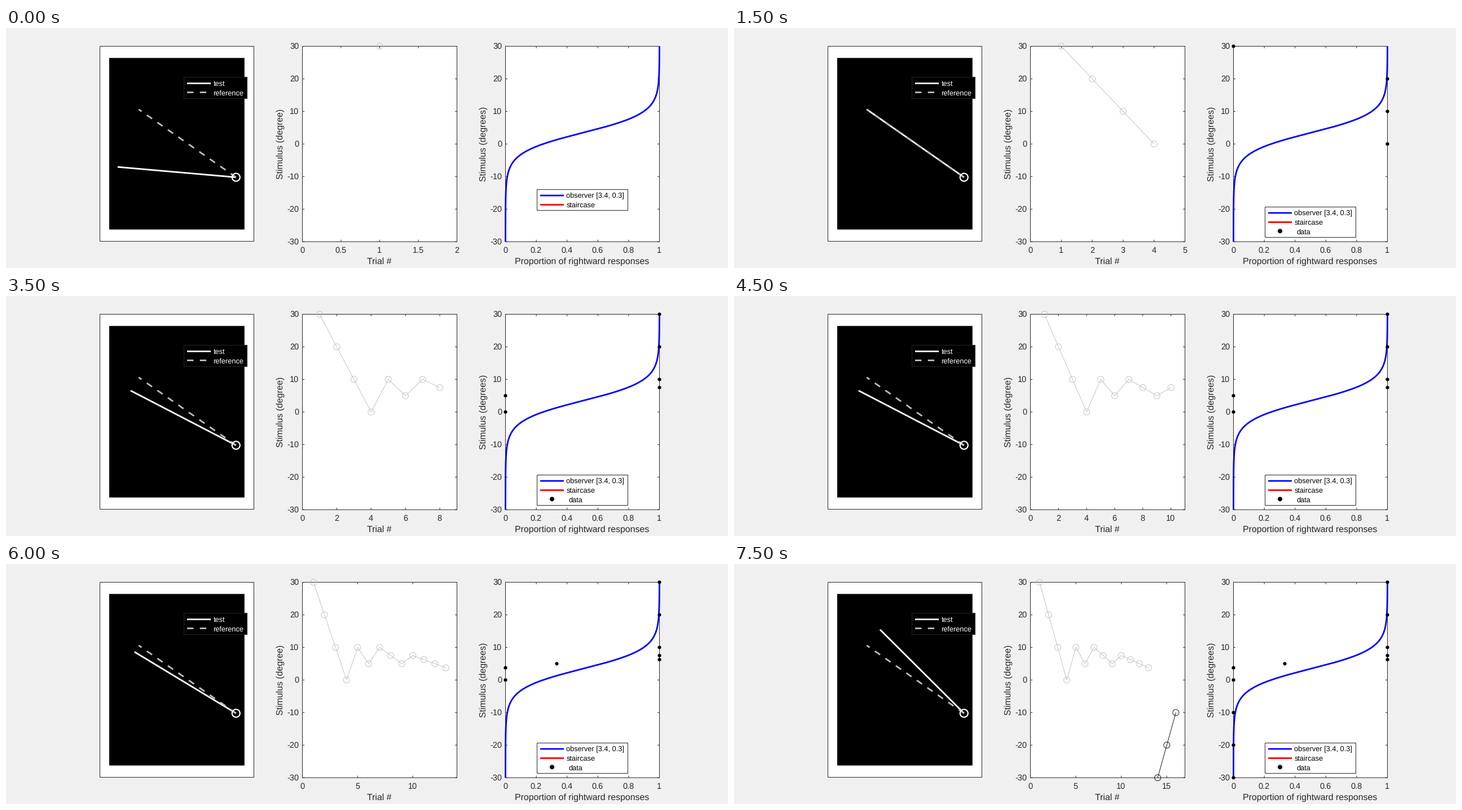
Recreate the animation shown at these times as a matplotlib script. Size 1280 px wide and 427 px high, loop 8 s.

```python
import matplotlib.pyplot as plt
import numpy as np
from matplotlib.animation import FuncAnimation
from matplotlib.patches import Circle, Rectangle

W, H, DPI = 1280, 427, 72  # at 72 dpi one point is one pixel
INK = "#262626"
TICK, LABEL, LEGEND = 14.5, 15.9, 12.8
TOP, BOTTOM = 32.5, 380.2
TRIAL_X = (525.5, 799.5)
PROP_X = (885.5, 1158.5)
PIVOT, ARM, REF_ANGLE = (407.8, 265.6), 210.7, 35
THRESHOLD, SLOPE = 3.42, 0.33

STIMULI = [30, 20, 10, 0, 10, 5, 10, 7.5, 5, 7.5, 6.25, 5, 3.75, -30, -20, -10]
RESPONSES = [1, 1, 1, 0, 1, 0, 1, 1, 0, 1, 1, 1, 0, 0, 0, 0]
FIRST_RUN = 13

plt.rcParams.update({"font.family": "Liberation Sans", "path.snap": False,
                     "text.hinting": "no_hinting"})
fig = plt.figure(figsize=(W / DPI, H / DPI), dpi=DPI, facecolor="#f0f0f0")
ax = fig.add_axes([0, 0, 1, 1])
ax.set_xlim(0, W)
ax.set_ylim(H, 0)
ax.axis("off")


def line(xs, ys, color=INK, lw=1.0, z=2, **kw):
    return ax.plot(xs, ys, color=color, lw=lw, zorder=z,
                   solid_capstyle="butt", dash_capstyle="butt", **kw)[0]


def box(x0, y0, x1, y1, face="white", edge=INK, z=1):
    return ax.add_patch(Rectangle((x0, y0), x1 - x0, y1 - y0, facecolor=face,
                                  edgecolor=edge, lw=1, zorder=z, snap=False))


def circle(x, y, r, face="none", edge="none", lw=0.0, z=4):
    return ax.add_patch(Circle((x, y), r, facecolor=face, edgecolor=edge,
                               lw=lw, zorder=z))


def text(x, y, s, size, color=INK, ha="center", **kw):
    return ax.text(x, y, s, size=size, color=color, ha=ha, va="baseline",
                   zorder=6, **kw)


def stim_y(stimulus):
    return TOP + (30 - np.asarray(stimulus)) * (BOTTOM - TOP) / 60


def scale(value, span, limit=1):
    return span[0] + np.asarray(value) * (span[1] - span[0]) / limit


def x_ticks(span, limit, step):
    artists = []
    for value in np.arange(0, limit + 1e-9, step):
        x = scale(value, span, limit)
        artists += [line([x, x], [BOTTOM, BOTTOM - 3.5]),
                    line([x, x], [TOP, TOP + 3.5]),
                    text(x - 0.3, 400.3, f"{value:g}", TICK)]
    return artists


def panel(span, xlabel, ylabel):
    left, right = span
    box(left, TOP, right, BOTTOM)
    for value in range(-30, 31, 10):
        y = stim_y(value)
        line([left, left + 3.5], [y, y])
        line([right, right - 3.5], [y, y])
        text(left - 6.2, y + 4.8, str(value), TICK, ha="right")
    text(sum(span) / 2 - 0.6, 420, xlabel, LABEL)
    text(left - 34.6, stim_y(0), ylabel, LABEL, rotation=90, rotation_mode="anchor")


def arm_tip(angle):
    a = np.radians(angle)
    return PIVOT[0] - ARM * np.cos(a), PIVOT[1] - ARM * np.sin(a)


def draw_arm(angle, color, z, **kw):
    tip = arm_tip(angle)
    return line([PIVOT[0], tip[0]], [PIVOT[1], tip[1]], color, 2.8, z, **kw)


def draw_scene():
    box(166.5, 32.5, 439.5, 379.5)
    box(183, 53.3, 422.8, 358.5, "black", "none", z=1.5)
    dashes = dict(linestyle=(0, (11.4 / 2.8, 11.3 / 2.8)))
    draw_arm(REF_ANGLE, "#bebebe", 4, **dashes)
    circle(*PIVOT, 7, edge="white", lw=2.2, z=5)
    box(315.5, 87.5, 427.5, 125.5, "black", z=5)
    line([321, 363], [98.5, 98.5], "white", 2.8, 6)
    line([321, 363], [114.5, 114.5], "#bebebe", 2.8, 6, **dashes)
    text(367.5, 103.2, "test", LEGEND, "white", "left")
    text(367.5, 119.4, "reference", LEGEND, "white", "left")

    panel(TRIAL_X, "Trial #", "Stimulus (degree)")
    panel(PROP_X, "Proportion of rightward responses", "Stimulus (degrees)")
    x_ticks(PROP_X, 1, 0.2)
    s = np.linspace(-30, 30, 300)
    observer = 1 / (1 + np.exp(-SLOPE * (s - THRESHOLD)))
    line(scale(observer, PROP_X), stim_y(s), "blue", 2.8, 3)


def curve_legend(with_data):
    y = 329 if with_data else 298
    artists = [box(941.5, y - 10.5, 1102.5, y + (43.5 if with_data else 26.5), z=5)]
    for row, color, name in ((y, "blue", "observer [3.4, 0.3]"),
                             (y + 16.4, "red", "staircase")):
        artists += [line([947, 989], [row, row], color, 2.8, 6),
                    text(993.3, row + 4.6, name, LEGEND, "black", "left")]
    if with_data:
        artists += [circle(968, y + 32.3, 4, "black", z=6),
                    text(997, y + 37.6, "data", LEGEND, "black", "left")]
    return artists


def proportions(count):
    shown, answers = STIMULI[:count], RESPONSES[:count]
    levels = sorted(set(shown))
    if len(levels) == count:  # without repeats, answers keep trial order
        return zip(levels, answers)
    return [(lv, np.mean([a for s, a in zip(shown, answers) if s == lv]))
            for lv in levels]


def staircase(trials, limit, color):
    xs = scale(trials, TRIAL_X, limit)
    ys = stim_y([STIMULI[t - 1] for t in trials])
    return [line(xs, ys, color, 0.9, 3)] + [
        circle(x, y, 5.5, edge=color, lw=0.9) for x, y in zip(xs, ys)]


moving = []


def update(frame):
    while moving:
        moving.pop().remove()
    count = frame + 1
    limit = count + 1
    step = next(s for s in (0.5, 1, 2, 5) if limit // s <= 5)
    moving.append(draw_arm(REF_ANGLE - STIMULI[frame], "white", 3))
    moving.extend(x_ticks(TRIAL_X, limit, step))
    moving.extend(staircase(range(1, min(count, FIRST_RUN) + 1), limit, "#bfbfbf"))
    if count > FIRST_RUN:
        moving.extend(staircase(range(FIRST_RUN + 1, count + 1), limit, "black"))
    moving.extend(curve_legend(count > 1))
    if count > 1:
        moving.extend(circle(scale(p, PROP_X), stim_y(level), 3.1, "black")
                      for level, p in proportions(count))
    return moving


draw_scene()
anim = FuncAnimation(fig, update, frames=len(STIMULI), interval=500,
                     init_func=lambda: update(0), repeat=True, repeat_delay=0,
                     blit=False)
plt.show()
```
